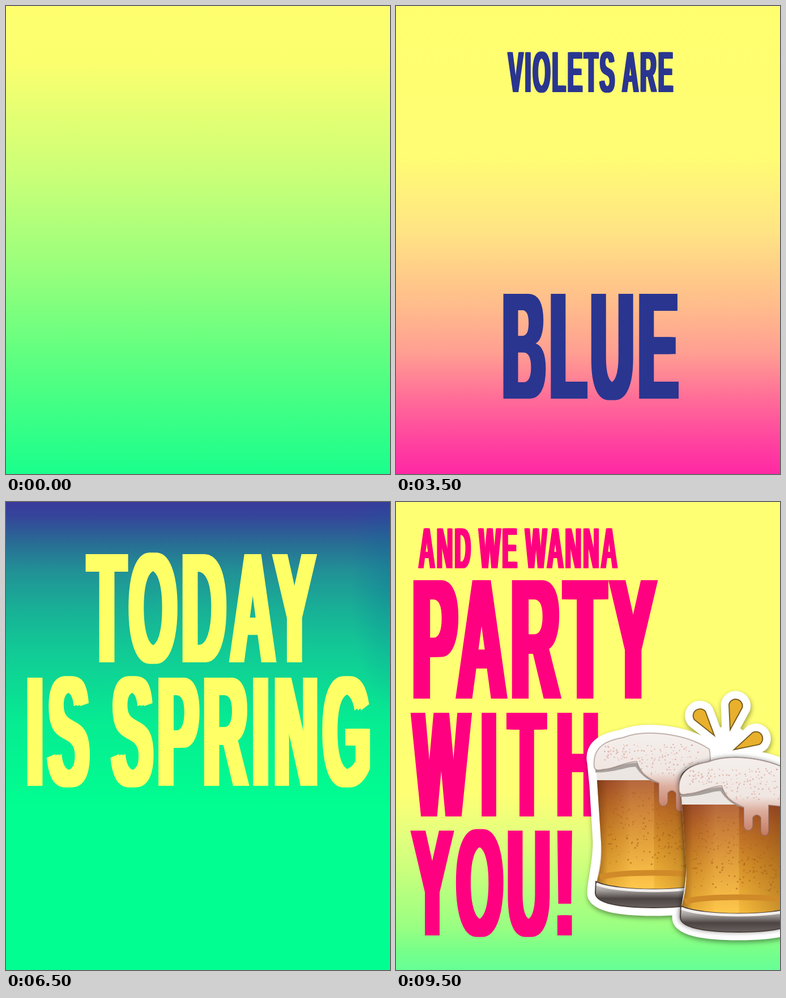
An HTML page that plays this animation: 678x826 px, repeating every 10000 ms.

```html
<!DOCTYPE html>
<html lang="en">
<head>
<meta charset="utf-8">
<title>Spring invitation</title>
<style>
html, body { margin: 0; width: 100%; height: 100%; overflow: hidden; }
section, svg, .t, .label { position: absolute; }
section, svg { left: 0; top: 0; width: 100%; height: 100%; }
section { overflow: hidden; visibility: hidden; }
#roses { background: linear-gradient(#ffff6e, #fbff6e 12%, #c8ff78 37%, #96ff7c 57%, #50ff82 80%, #1aff8c); color: #ff0080; }
#violets { background: linear-gradient(#ffff6e, #fffd74 32%, #ffe484 48%, #ffb98c 65%, #ff9f92 74%, #ff6c98 84%, #ff3fa0 94%, #ff28a4); color: #2a3590; }
#today { background: radial-gradient(70px 240px at 678px 130px, #0a5a9a44, transparent),
  linear-gradient(#3a3a9c, #35459a 3%, #286e94 9%, #219296 15%, #18b096 23%, #12c896 31%, #06ec92 47%, #00ff90 66%); color: #ffff66; }
#party { background: linear-gradient(#ffff73 62%, #e4ff7e 71%, #ccff7c 78%, #98ff82 91%, #76ff8a 96%, #66ff96); color: #ff0080; }
/* one heavy condensed display style for every headline */
.t {
  left: calc(var(--x) * 1px);
  top: calc(var(--y) * 1px - .1585em);
  font: bold calc(var(--h) / .688 * 1px)/1 "Liberation Sans", Arial, sans-serif;
  letter-spacing: .077em;
  word-spacing: -.06em;
  white-space: nowrap;
  transform: scaleX(.39);
  transform-origin: 0 0;
  text-shadow: .052em 0, -.052em 0;
}
.label {
  left: 189px; width: 300px; height: 43px;
  background: #00ff80; color: #2a3388;
  font: italic bold 23px/43px "Liberation Sans", Arial, sans-serif;
  text-align: center; white-space: nowrap;
  -webkit-text-stroke: 1px;
}
</style>
</head>
<body>
<section id="roses">
  <div class="t" data-beat="1" style="--x:216;--y:108;--h:70">ROSES ARE</div>
  <div class="t" data-beat="2" style="--x:225;--y:184;--h:185">RED</div>
  <div class="label" data-beat="3" style="top:28px">PETALS SWIRL DANCE</div>
  <svg data-beat="4">
    <path d="M345 540C350 640 330 720 342 822" fill="none" stroke="#4c8a2c" stroke-width="14" stroke-linecap="round"/>
    <g fill="#6aaa3a" stroke="#3c7026" stroke-width="3">
      <path d="M340 690C300 620 250 620 215 640C235 690 285 715 340 690Z"/>
      <path d="M338 745C370 675 425 660 468 680C450 735 400 765 338 745Z"/>
      <path d="M345 570C300 575 270 550 262 520L430 520C420 550 390 575 345 570Z"/>
    </g>
    <g fill="#e0203c" stroke="#98102c" stroke-width="4">
      <path d="M345 558C265 555 235 500 242 415C270 370 310 352 345 350C390 352 425 375 450 415C455 500 420 555 345 558Z"/>
      <path fill="#c01432" d="M290 400C300 360 390 360 402 400C395 450 300 450 290 400Z"/>
      <path fill="none" d="M315 405C325 380 370 382 372 405C365 422 340 420 338 404"/>
      <path fill="#ec3048" d="M242 415C290 420 335 450 355 556C275 560 235 500 242 415Z"/>
      <path fill="#ee3a50" d="M450 415C400 420 345 470 325 554C420 570 455 500 450 415Z"/>
    </g>
  </svg>
</section>

<section id="violets">
  <div class="t" data-beat="1" style="--x:198;--y:83;--h:70">VIOLETS ARE</div>
  <div class="t" data-beat="2" style="--x:188;--y:509;--h:185">BLUE</div>
  <svg data-beat="3">
    <defs>
      <radialGradient id="blue" gradientUnits="userSpaceOnUse" cx="345" cy="372" r="180">
        <stop offset="0" stop-color="#4445b4"/><stop offset=".4" stop-color="#5058c6"/>
        <stop offset=".58" stop-color="#6478c0"/><stop offset=".85" stop-color="#6a88c4"/><stop offset="1" stop-color="#5474b0"/>
      </radialGradient>
      <linearGradient id="leaf" x2="0" y2="1"><stop stop-color="#76a63c"/><stop offset="1" stop-color="#a6d062"/></linearGradient>
      <clipPath id="bloom"><use href="#petals"/></clipPath>
    </defs>
    <g fill="url(#leaf)" stroke="#53702e" stroke-width="3">
      <path d="M197 428C178 460 172 500 172 530C190 545 260 540 305 520L262 465Z"/>
      <path d="M362 523C400 543 450 540 484 514C485 495 470 480 455 468L411 466Z"/>
    </g>
    <path d="M180 528L262 462M212 500L208 465M212 500L262 510M232 484L230 455M398 530L452 472M425 502L470 502M408 520L458 522" fill="none" stroke="#a9b67c" stroke-width="6"/>
    <path id="petals" fill="url(#blue)" stroke="#41568c" stroke-width="3" stroke-linejoin="round" d="
      M345 365L232 306C200 270 225 200 312 194C350 190 364 222 357 250Z
      M345 365L357 250C360 207 385 202 420 207C500 220 506 290 488 314C478 330 450 330 435 335Z
      M345 365L430 340C455 328 490 328 500 345C530 400 505 450 470 468C440 482 425 475 410 466Z
      M345 365L262 455C235 462 200 445 188 410C170 350 190 310 232 306C265 305 300 335 345 365Z
      M345 365C290 400 255 440 259 470C264 510 320 525 350 523C390 520 412 500 411 468C405 440 375 400 345 365Z"/>
    <g id="veins" clip-path="url(#bloom)" stroke-linecap="round"></g>
    <path d="M322 318L338 315L368 350C370 370 355 380 340 376C322 365 325 340 322 318Z" fill="#302f90"/>
    <path d="M326 325C324 350 330 372 350 374" fill="none" stroke="#242266" stroke-width="8"/>
    <path d="M282 270L318 300" stroke="#3c3c92" stroke-width="10"/>
    <g fill="#2f2c86"><circle cx="287" cy="263" r="10"/><circle cx="305" cy="263" r="10"/><circle cx="290" cy="278" r="11"/></g>
    <g id="pollen"></g>
  </svg>
  <div class="label" data-beat="4" style="top:747px">PETALS SWIRL DANCE</div>
</section>

<section id="today">
  <div class="t" data-beat="1" style="--x:145;--y:93;--h:191">TODAY</div>
  <div class="t" data-beat="2" style="--x:36;--y:311;--h:191">IS</div>
  <div class="t" data-beat="3" style="--x:187;--y:311;--h:191">SPRING</div>
  <svg data-beat="4" id="blossoms"></svg>
</section>

<section id="party">
  <div class="t" data-beat="1" style="--x:40;--y:48;--h:70">AND WE WANNA</div>
  <div class="t" data-beat="2" style="--x:29;--y:138;--h:209">PARTY</div>
  <div class="t" data-beat="3" style="--x:31;--y:372;--h:183;letter-spacing:.2em">WITH</div>
  <div class="t" data-beat="3" style="--x:29;--y:581;--h:185">YOU!</div>
  <svg data-beat="4">
    <defs>
      <linearGradient id="beer" x2="0" y2="1">
        <stop stop-color="#a4502e"/><stop offset=".2" stop-color="#bc6a2a"/><stop offset=".55" stop-color="#dc962c"/><stop offset="1" stop-color="#ffc640"/>
      </linearGradient>
      <linearGradient id="side">
        <stop stop-color="#50200088"/><stop offset=".1" stop-color="#70300022"/><stop offset=".3" stop-color="#ffd08030"/>
        <stop offset=".5" stop-color="#ffd08030"/><stop offset=".51" stop-color="#70300010"/><stop offset="1" stop-color="#50200066"/>
      </linearGradient>
      <linearGradient id="foam" x2="0" y2="1">
        <stop stop-color="#f4efec"/><stop offset=".5" stop-color="#f0e6e2"/><stop offset=".68" stop-color="#dcae9e"/><stop offset="1" stop-color="#c47860"/>
      </linearGradient>
      <linearGradient id="base" x2="0" y2="1">
        <stop stop-color="#e8e4e0"/><stop offset=".35" stop-color="#a09c9a"/><stop offset=".65" stop-color="#4c4442"/><stop offset="1" stop-color="#6a6260"/>
      </linearGradient>
      <path id="shape" d="M352 460C345 430 375 420 400 416C440 400 510 408 550 435C560 460 553 480 550 500L545 600C545 650 556 670 558 690C558 707 520 716 455 716C390 716 352 707 352 690C352 670 362 640 362 600L356 500Z"/>
      <path id="drink" d="M355 491H550L545 600C545 640 553 660 556 672C520 688 390 688 354 672C360 650 364 630 362 600Z"/>
      <path id="spark" d="M0 0L-12 -43A12 12 0 0 1 12 -43Z"/>
      <g id="sparks">
        <use href="#spark" transform="translate(562 412) rotate(-36)"/>
        <use href="#spark" transform="translate(590 402) rotate(13)"/>
        <use href="#spark" transform="translate(597 437) rotate(63)"/>
      </g>
      <g id="mug">
        <path d="M352 450H552L545 600C545 650 556 670 558 690H352C352 670 362 640 362 600Z" fill="#ece6e2"/>
        <use href="#drink" fill="url(#beer)"/>
        <use href="#drink" fill="url(#side)"/>
        <path d="M360 662C400 652 510 652 552 662" fill="none" stroke="#d08a28" stroke-width="10"/>
        <g id="bubbles" fill="#a8601c"></g>
        <path d="M353 670C390 688 520 688 557 670L558 690C558 707 520 716 455 716C390 716 352 707 352 690Z" fill="url(#base)" stroke="#4a3e38" stroke-width="2"/>
        <path d="M354 674C390 690 520 690 556 674" fill="none" stroke="#f2efec" stroke-width="5"/>
        <path d="M352 474C390 474 410 462 425 464C440 488 455 490 466 494" fill="none" stroke="#a8a09c" stroke-width="7"/>
        <path d="M350 468C346 430 375 420 400 416C440 400 510 408 553 436C558 455 552 480 545 496L508 492V538A7 8 0 0 1 494 538V514C490 508 484 508 480 514V528A8 9 0 0 1 464 528V496C445 488 432 480 425 458C405 458 385 472 365 472Q352 476 350 468Z" fill="url(#foam)" stroke="#806058" stroke-opacity=".45" stroke-width="2"/>
        <g id="specks" fill="#d8a294"></g>
      </g>
    </defs>
    <g fill="#fff" stroke="#fff" stroke-width="29" stroke-linejoin="round" style="filter:drop-shadow(1px 4px 4px #0006)">
      <use href="#shape"/><use href="#shape" x="150" y="43"/><use href="#sparks"/>
      <path d="M562 420L592 404L630 440L565 450Z"/>
    </g>
    <g fill="#e8b02c" stroke="#7a6020" stroke-width="2"><use href="#sparks"/></g>
    <use href="#mug"/>
    <use href="#shape" x="150" y="43" style="filter:drop-shadow(-2px 0 4px #0008)"/>
    <use href="#mug" x="150" y="43"/>
  </svg>
</section>

<script>
const $ = id => document.getElementById(id);
let seed = 7;
const rand = (a, b) => a + (b - a) * ((seed = seed * 16807 % 2147483647) / 2147483647);

function add(parent, tag, attrs) {
  const el = document.createElementNS("http://www.w3.org/2000/svg", tag);
  for (const k in attrs) el.setAttribute(k, attrs[k]);
  parent.append(el);
}

function ray(angle, from, to, stroke, width) {
  const c = Math.cos(angle), s = Math.sin(angle);
  add($("veins"), "line", {
    x1: 345 + from * c, y1: 370 + from * s, x2: 345 + to * c, y2: 370 + to * s,
    stroke, "stroke-width": width, "stroke-opacity": .5
  });
}
for (let i = 0; i < 44; i++) {
  const a = i * Math.PI / 22;
  ray(a, 92, rand(135, 158), "#8496c6", 5);
  ray(a + .07, 55, rand(84, 112), "#4d54c2", 8);
}

const pinks = ["#b45cc8", "#d080d8", "#9a50c0", "#c86cd0"];
for (let i = 0; i < 48; i++) {
  const a = rand(0, 2 * Math.PI), r = rand(0, 27);
  add($("pollen"), "circle", { cx: 323 + r * Math.cos(a), cy: 299 + r * Math.sin(a), r: rand(2.5, 4.5), fill: pinks[i % 4] });
}

for (let i = 0; i < 220; i++)
  add($("bubbles"), "circle", { cx: rand(372, 535), cy: rand(510, 645), r: rand(.8, 1.7), opacity: .6 });
for (let i = 0; i < 150; i++) {
  const x = rand(368, 535);
  add($("specks"), "circle", { cx: x, cy: rand(428, x < 430 ? 456 : 482), r: rand(.7, 1.5), opacity: .7 });
}

function blossom(x, y, r, fill) {
  for (let i = 0; i < 5; i++)
    add($("blossoms"), "ellipse", {
      cx: x, cy: y - r * .58, rx: r * .36, ry: r * .42, fill, stroke: "#d83c88", "stroke-width": 3,
      transform: `rotate(${i * 72} ${x} ${y})`
    });
  add($("blossoms"), "circle", { cx: x, cy: y, r: r * .24, fill: "#ffe040" });
}
blossom(187, 660, 85, "#ff9ccc");
blossom(504, 660, 85, "#ff9ccc");
blossom(345, 643, 116, "#ff80b8");

// four scenes of five half-second beats; each beat reveals the next part
const scenes = [...document.querySelectorAll("section")];
function frame(now) {
  const beat = Math.floor(now % 10000 / 500);
  scenes.forEach((scene, i) => {
    const on = i === Math.floor(beat / 5);
    scene.style.visibility = on ? "visible" : "hidden";
    for (const el of scene.children)
      el.style.visibility = on && beat % 5 >= el.dataset.beat ? "visible" : "hidden";
  });
}
const start = performance.now();
function loop() {
  frame(performance.now() - start);
  requestAnimationFrame(loop);
}
loop();
</script>
</body>
</html>
```
